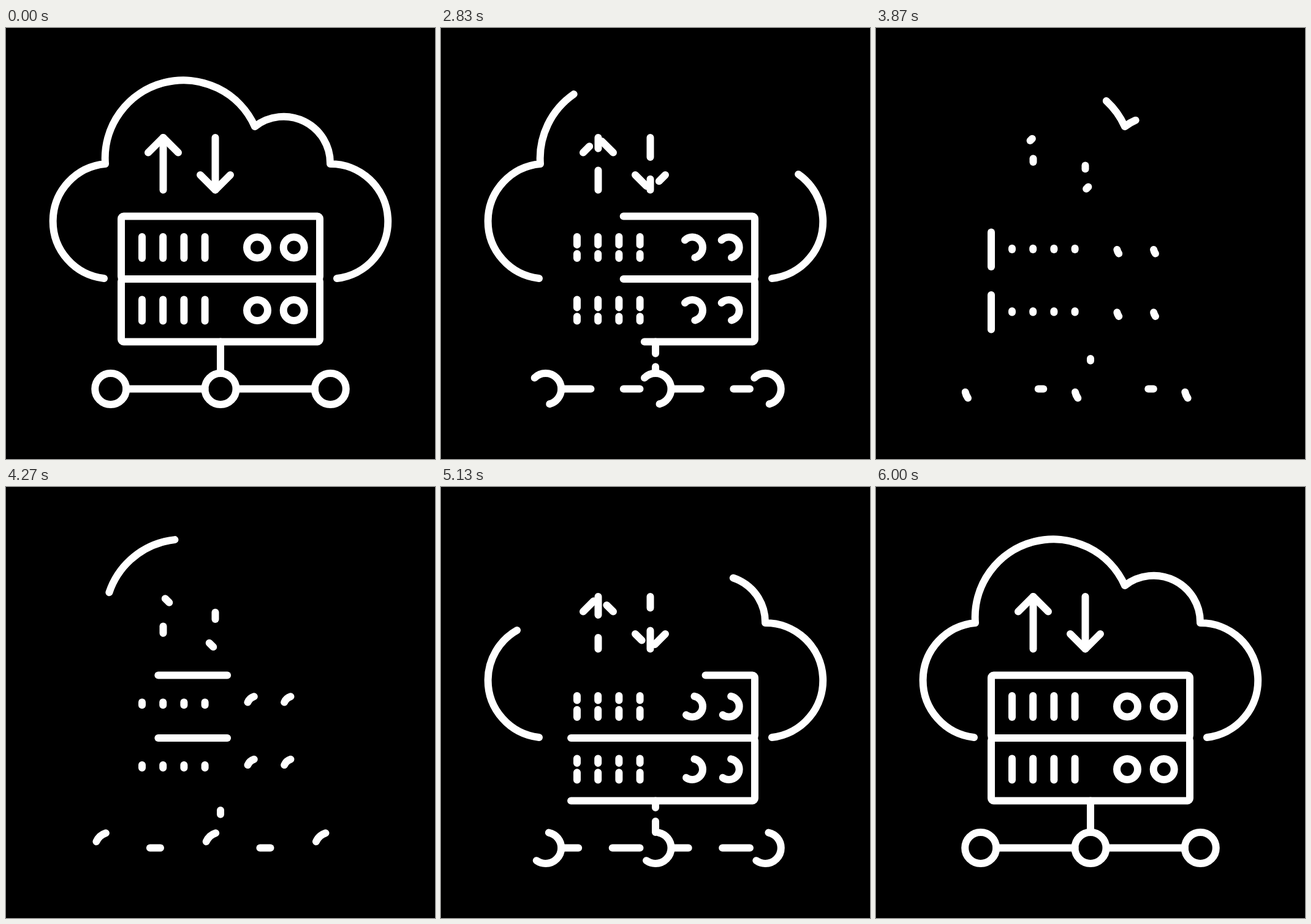
Write an HTML page that moves like this. It is 700 by 704 pixels and loops after 8010 ms.

```html
<!DOCTYPE html>
<html lang="en">
<head>
<meta charset="utf-8">
<title>Cloud server</title>
<style>
  html, body { margin: 0; height: 100%; overflow: hidden; background: #000; }
  svg { display: block; width: 100vw; height: 100vh; }
</style>
</head>
<body>
<svg viewBox="0 0 700 704">
  <g id="icon" fill="none" stroke="#fff" stroke-width="12" stroke-linecap="round" stroke-linejoin="round"></g>
</svg>
<script>
const icon = document.getElementById('icon');
const LOOP = 8010;

function add(d) {
  const path = document.createElementNS('http://www.w3.org/2000/svg', 'path');
  path.setAttribute('d', d);
  path.setAttribute('pathLength', 1);
  icon.append(path);
}

// Clockwise from the rightmost point
const circle = (x, y, r) =>
  add(`M${x + r} ${y}a${r} ${r} 0 0 1 ${-2 * r} 0a${r} ${r} 0 0 1 ${2 * r} 0z`);

// Cloud
add('M540 409A93.8 93.8 0 0 0 529 222A76 76 0 0 0 406 161A127.7 127.7 0 0 0 162 222A94 94 0 0 0 160 409');

// Arrows
add('M256.5 179V264.5');
add('M232 203.5L256.5 179L281 203.5');
add('M341.5 264.5V179');
add('M366 240L341.5 264.5L317 240');

// Server units
for (const y of [307.5, 410]) {
  add(`M508 ${y + 102.5}h-316a4 4 0 0 1 -4 -4v-94.5a4 4 0 0 1 4 -4h316a4 4 0 0 1 4 4v94.5a4 4 0 0 1 -4 4z`);
  for (let i = 0; i < 4; i++) add(`M${222 + i * 34.2} ${y + 68.5}v-35`);
  for (const x of [410, 469.7]) circle(x, y + 51, 17);
}

// Network
add('M350 564V512.5');
for (const x of [170.7, 350, 529.3]) circle(x, 589.5, 25.5);
for (const x of [324.5, 504]) add(`M${x} 589.5h-128`);

function draw(now) {
  // 30 steps per second, aligned to 10 ms
  const t = Math.floor(now % LOOP / 10) * 10;
  const step = Math.floor((t + 5) * 0.03);
  const u = Math.min(1, Math.max(0, (step - 60) / 120));

  // One end of each stroke runs three times as fast as the other; they swap halfway
  const start = Math.min(3 * u, 1 + u);
  const length = Math.abs(1 - 2 * u);

  icon.style.visibility = length ? 'visible' : 'hidden';
  icon.setAttribute('stroke-dasharray', length < 1 ? `${length} ${1 - length}` : 'none');
  icon.setAttribute('stroke-dashoffset', -(start % 1));
  requestAnimationFrame(() => draw(performance.now() - begin));
}

const begin = performance.now();
draw(0);
</script>
</body>
</html>
```
